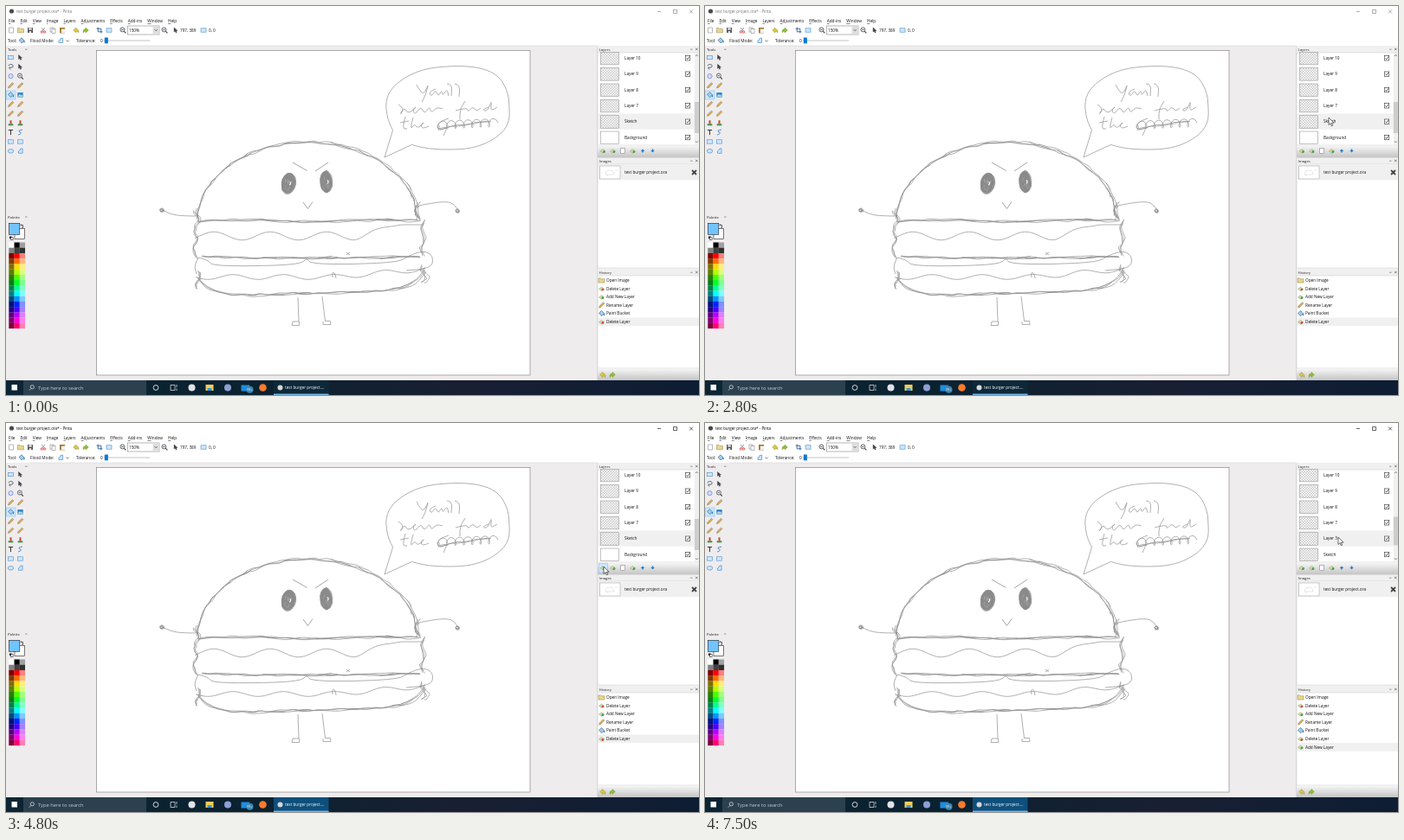
Write an HTML page that moves like this. It is 800x450 px and loops after 8000 ms.

```html
<!DOCTYPE html>
<html lang="en">
<head>
<meta charset="utf-8">
<title>Burger sketch</title>
<style>
html, body { margin: 0; width: 100%; height: 100%; overflow: hidden; background: #fff; }
svg { display: block; width: 800px; height: 450px; }
text { font-family: "Open Sans", "Noto Sans", sans-serif; white-space: pre; }
.key { text-decoration: underline; }
</style>
</head>
<body>
<svg id="stage" viewBox="0 0 800 450" xmlns="http://www.w3.org/2000/svg"></svg>
<script>
const LOOP = 8000, STEP = 100;
const { sin, cos, abs, sign, sqrt, PI } = Math;
const clamp = v => Math.max(0, Math.min(1, v));

// ---- markup helpers ----
const rect = (x, y, w, h, fill, more = '') =>
  `<rect x="${x}" y="${y}" width="${w}" height="${h}" fill="${fill}" ${more}/>`;
const frame = (x, y, w, h, fill, line = '#888') => rect(x, y, w, h, fill, `stroke="${line}" stroke-width=".6"`);
const path = (d, stroke, width = 0.7, fill = 'none') =>
  `<path d="${d}" stroke="${stroke}" stroke-width="${width}" fill="${fill}"/>`;
const disc = (x, y, r, fill) => `<circle cx="${x}" cy="${y}" r="${r}" fill="${fill}"/>`;
const ring = (x, y, r, line, fill = 'none') =>
  `<circle cx="${x}" cy="${y}" r="${r}" fill="${fill}" stroke="${line}" stroke-width=".8"/>`;
const text = (x, y, s, fill = '#111', size = 4.7) =>
  `<text x="${x}" y="${y}" font-size="${size}" fill="${fill}">${s}</text>`;
const group = (id, body) => `<g id="${id}">${body}</g>`;

// ---- small icons, drawn around the origin ----
const glyphs = {
  page: () => frame(-2.3, -3, 4.6, 6, '#fff'),
  folder: () => path('M-3.5-2.5h2.6l1 1h3.4v4.3h-7z', '#8f8352', 0.5, '#e9d68c'),
  disk: () => rect(-3, -3, 6, 6, '#555') + rect(-1.8, -2.6, 3.6, 2.2, '#eee') + rect(-1.2, 1, 2.4, 2, '#ddd'),
  cut: () => path('M-2-3L1.3 1M2-3L-1.3 1', '#777') + ring(-1.7, 2, 1.2, '#d33') + ring(1.7, 2, 1.2, '#d33'),
  copy: () => frame(-3, -3, 4, 5, '#fff') + frame(-1, -1.5, 4, 5, '#fff'),
  paste: () => rect(-3, -3, 6, 6.4, '#a87426') + rect(-1.2, -1.4, 4.2, 4.6, '#eef1f5'),
  undo: (c = '#e2c93c') => path('M-3.3 0L0-3v1.6q4 .4 2.6 4.4Q2 1 0 1.2V3z', '#7a7a20', 0.4, c),
  redo: () => `<g transform="scale(-1 1)">${glyphs.undo('#86c436')}</g>`,
  crop: () => path('M-1.8-3.4V1.8H3.4M-3.4-1.8H1.8V3.4', '#3a6ea5', 1),
  lens: () => ring(-0.6, -0.6, 2.5, '#444', '#e9f2fa') + path('M1.3 1.3L3.4 3.4', '#444', 1.2) + path('M-1.8-.6H.6', '#333'),
  arrow: () => path('M-2-3V2L-.7.9.2 3l1-.5-.8-2H2z', '#333', 0.4, '#445'),
  lasso: () => path('M-2.5-1C-2-4 4-3 2.5 0Q0 2-1.5.5Q-2 2-.5 3.2', '#456', 0.9),
  round: () => ring(0, 0, 2.6, '#7687d8', '#d6ddfa'),
  pen: (c = '#e6b34a') => path('M-3 3L-2.3.8 2-3.3 3.3-2-.9 2.3z', '#555', 0.4, c),
  bucket: () => path('M-3-.5L0-3.2 3 0 .2 3z', '#456', 0.6, '#9ed0f2') + path('M3 0v2.5', '#2a84cf', 1.2),
  image: () => rect(-3.2, -2.7, 6.4, 5.4, '#2a86ce') + path('M-3 2L-.6-.8 1 1 2-.2 3 2z', '#9cc', 0.3, '#cfe8da'),
  stamp: () => rect(-2.8, 1, 5.6, 2, '#3d8f46') + rect(-1, -3, 2, 4, '#c34b35'),
  type: () => path('M-2.6-2.6h5.2M0-2.6V3', '#333', 1),
  line: () => path('M-2.5 3Q3 1-.5-.5T2.5-3', '#3d85c6', 0.9),
  box: () => frame(-3, -2.2, 6, 4.4, '#cfe6fb', '#4b90cc'),
  oval: () => `<ellipse rx="3.2" ry="2.3" fill="#cfe6fb" stroke="#4b90cc" stroke-width=".7"/>`,
  blob: () => path('M-2 2.5Q-3-.5-.5-.8-1-3 2.5-3L2.6 2.5z', '#4b90cc', 0.7, '#cfe6fb'),
  layer: (c = '#3fa146') => path('M-3 .4L0-1.8 3 .4 0 2.6z', '#6b7d4a', 0.4, '#d8e0a8') + disc(1.4, 1.2, 1.4, c),
  up: () => path('M0-2L2.3.4H.8V2H-.8V.4H-2.3z', 'none', 0, '#2c7cc4'),
  down: () => `<g transform="scale(1 -1)">${glyphs.up()}</g>`,
};
const icon = (kind, x, y, tint) => `<g transform="translate(${x} ${y})">${glyphs[kind](tint)}</g>`;
const iconRow = (kinds, x, y, gap = 11.5) => kinds.split(' ').map((k, i) => icon(k, x + i * gap, y)).join('');

// ---- pencil lines ----
let seed = 7;
const rnd = () => (seed = (seed * 16807) % 2147483647) / 2147483647 - 0.5;
const GREY = '#8e8e8e';
const points = s => s.split(' ').map(p => p.split(',').map(Number));
const plot = (f, from, to, n = 40) => Array.from({ length: n + 1 }, (_, i) => f(from + (to - from) * i / n));
const graph = (f, from, to, n) => plot(x => [x, f(x)], from, to, n);

// Smooth line through the middles of the given points.
function smooth(pts) {
  let d = 'M' + pts[0];
  for (let i = 1; i < pts.length - 1; i++) {
    const [a, b] = [pts[i], pts[i + 1]];
    d += `Q${a} ${(a[0] + b[0]) / 2} ${(a[1] + b[1]) / 2}`;
  }
  return d + 'L' + pts[pts.length - 1];
}
const pencil = s => path(smooth(typeof s === 'string' ? points(s) : s), GREY);

// Several shaky passes, each drifting a little and broken into strokes.
function rough(pts, amp = 2.6, passes = 3) {
  let out = '';
  for (let n = 0; n < passes; n++) {
    const dx = rnd() * amp, dy = rnd() * amp;
    const shaky = pts.map(([x, y]) => [x + dx + rnd() * amp, y + dy + rnd() * amp]);
    const size = 9 + n * 4;
    for (let i = 0; i < shaky.length - 2; i += size) out += pencil(shaky.slice(i, i + size + 3));
  }
  return out;
}

const side = (x, y0, y1) => rough(plot(y => [x + 3 * sin(y / 3.5), y], y0, y1, 9), 3.5);
const knot = (x, y) => rough(plot(a => [x + 2 * cos(a), y + 2 * sin(a)], 0, 9, 10), 1.5);

function eye(x, y, rx, ry, tilt) {
  let scratch = '';
  for (let i = 0; i < 14; i++) scratch += `M${rnd() * rx * 1.3} ${rnd() * ry * 1.3}l${rnd() * 3} ${2 + rnd() * 3}`;
  return `<g transform="translate(${x} ${y}) rotate(${tilt})">
    <ellipse rx="${rx}" ry="${ry}" fill="#8a8a8a"/>
    ${rough(plot(a => [rx * cos(a), ry * sin(a)], 0, 2 * PI, 24), 1.2, 2)}
    ${path(scratch, '#b4b4b4', 0.5)}${path('M1.5-2q2 2 0 4', '#fff', 1.1)}</g>`;
}

const lettuce = x => {
  const rise = clamp((x - 405) / 50);
  return 266 - 5 * cos((x - 240) / 65 * 2 * PI) * (1 - rise) - 13 * rise;
};
const cheese = x => 313.5 - 3 * cos((x - 262) / 58 * 2 * PI) - 9 * clamp((x - 380) / 100);
const base = x => {
  const u = (x - 353) / 132;
  return 311 + 22 * (1 - u ** 8) - 4 * u;
};

const burger = () => [
  rough(plot(a => [349 - 127 * cos(a), 246 - 89 * sin(a)], 0, PI, 60), 2.6),
  rough(graph(x => 249 + sin(x / 25), 222, 477, 32), 2.6),
  rough(graph(x => 290 + 1.5 * sin((x - 226) / 80), 226, 478, 32), 2.6),
  rough(graph(base, 222, 485, 40), 2.8),
  side(221, 236, 262), side(219, 262, 290), side(221, 308, 328),
  side(474, 228, 248), side(481, 248, 288), side(483, 300, 320),
  pencil(graph(lettuce, 218, 482)),
  pencil(graph(cheese, 219, 484)),
  pencil('377,314 376,308 380,309 381,315'),
  pencil('222,291 234,294 237,300 280,301 340,299 348,291 350,298 400,299 455,296 464,289 482,283 492,288 493,299 484,304 462,306'),
  pencil('222,291 217,300 220,310'),
  path('M393 285l4 3m0-3l-4 3', GREY),
  pencil('222,243 205,243 190,241 179,235'), knot(180, 236),
  pencil('472,232 490,228 510,226 518,230 522,237'), knot(521, 237),
  path('M337 337L338 365H331L330 369.500H338.500V365M365 336L368.500 364.500H374.500L375 368.500H366V365', GREY),
  eye(326, 205, 8, 12, 10), eye(369.5, 203.5, 6.8, 12.5, -3),
  path('M331 181L347.500 190.500M372 181L357 191M343 227L348.500 234.500 354 226.500', GREY, 0.8),
].join('');

function bubble() {
  const bend = v => sign(v) * abs(v) ** 0.83;
  const rim = plot(a => {
    const x = 510 + 71 * bend(cos(a));
    return [x + sin(5 * a), 118 + 48 * bend(sin(a)) - (sin(a) < 0 ? (x - 510) * 0.06 : 0)];
  }, 0.845 * PI, 2.67 * PI, 60);
  const scribble = plot(t => [497 + 68 * t + 3 * cos(t * 44), 138 - 3 * t + 5 * sin(t * 44)], 0, 1, 60);
  const words = [
    '474,91 479,101 484,100 488,89 484,104 480,111', '496,96 488,99 491,105 496,97 499,105 503,97 504,104 509,96 511,104',
    '509,90 515,90 514,104', '518,90 524,91 523,105',
    '453,114 460,118 454,127 460,117 464,125 475,116 469,119 472,126 479,116 483,125 489,116 491,124 497,117 504,119',
    '530,110 524,118 524,131', '519,121 533,117 533,123 539,116 543,122 548,118', '557,117 549,120 556,122 561,108 559,122 567,117',
    '461,128 457,142 463,142', '455,135 465,133', '470,129 466,144 472,136 475,142 484,134 478,137 481,142 488,139',
  ];
  return path(`M437 175L${rim.join('L')}L437 175`, GREY) + words.map(pencil).join('') + pencil(scribble) +
    pencil('511,130 499,134 497,143 510,139 505,150') + rough(graph(x => 142 - (x - 500) * 0.16, 500, 560, 10), 3, 2);
}

// ---- application window ----
const PANEL = '#efecee', SELECTED = '#f0f0f0';
const dock = (x, y, right, title) => text(x, y, title, '#222', 4.3) + path(`M${right - 10} ${y - 1.5}h2.5`, '#555', 0.6) +
  (x > 600 ? path(`M${right - 4} ${y - 3}l2.6 2.6m0-2.6l-2.6 2.6`, '#444', 0.6) : '');
const caret = (x, y) => path(`M${x} ${y}l1.6 1.8 1.600-1.8`, '#333', 0.6);

function topBars() {
  const menus = 'File Edit View Image Layers Adjustments Effects Add-ins Window Help'.split(' ')
    .map((s, i) => `<tspan class="key" dx="${i && 6}">${s[0]}</tspan><tspan>${s.slice(1)}</tspan>`).join('');
  return rect(0, 0, 800, 46, '#fff') + disc(6.5, 6, 2.6, '#4a4a4a') + text(3, 19, menus) +
    iconRow('page folder disk', 6, 28, 11) + iconRow('cut copy paste', 43, 28, 11) +
    iconRow('undo redo', 81, 28, 11) + iconRow('crop marquee'.replace('marquee', 'box'), 108, 28, 11) +
    icon('lens', 135, 28) + icon('lens', 183, 28) + icon('arrow', 196, 28) + icon('box', 228, 28) +
    frame(140.5, 23, 36.5, 10, '#fff') + text(142, 29.8, '150%') + rect(169.5, 23.3, 7.2, 9.4, '#dedede') + caret(171.5, 27) +
    text(201, 29.8, '797, 389') + text(234, 29.8, '0, 0') +
    text(2, 41.8, 'Tool:') + icon('bucket', 18, 40) + text(28, 41.8, 'Flood Mode:') + icon('blob', 63, 40) + caret(69.5, 39.5) +
    text(81, 41.8, 'Tolerance:') + text(109, 41.8, '0') + path('M113 40H166', '#bbb', 0.9) + rect(113.8, 36.5, 4, 6.8, '#0078d7');
}

function leftDocks() {
  const tools = 'box arrow lasso arrow round lens pen pen bucket image pen pen pen pen stamp stamp type line box box oval blob';
  let out = rect(0, 46, 28, 387, PANEL) + dock(2, 51.7, 32, 'Tools') + frame(0.5, 98, 10.5, 10, '#cce8ff', '#8cc4ee');
  tools.split(' ').forEach((k, i) => out += icon(k, i % 2 ? 16.5 : 5.5, 59.5 + (i >> 1) * 10.83));
  out += dock(2, 245.5, 32, 'Palette') + frame(10, 257.5, 11.5, 12, '#fff', '#222') + frame(3.3, 251.3, 12.5, 13, '#72c4ff', '#222') +
    path('M17 253.500h2.500v3M16.500 253.500l1.200-1.200M19.500 257l-1.300-1.300', '#222') +
    rect(4, 266.5, 2.6, 2.6, '#222') + frame(5.5, 267.8, 2.6, 2.6, '#fff', '#222');
  const cell = 6.22, greys = ['#fff', '#000', '#a0a0a0', '#808080', '#404040', '#303030'];
  for (let i = 0; i < 48; i++) {
    const row = i / 3 | 0, col = i % 3;
    const fill = greys[i] || `hsl(${(row - 2) * 360 / 14} 100% ${25 + 25 * col}%)`;
    out += rect(3.3 + col * cell, 273.5 + row * cell, cell + 0.1, cell + 0.1, fill);
  }
  return out;
}

const layerList = (names, thumbY, thumbH) => names.map((s, i) => {
  const y = 60.3 + i * 18.35;
  return (i === 4 ? rect(683, y - 9.2, 111.5, 18.3, SELECTED) : '') +
    frame(686.5, y - 7, 21, 14.5, s === 'Background' ? '#fff' : 'url(#check)', '#999') + text(714, y + 1.7, s) +
    frame(784.3, y - 2.7, 5.4, 5.4, '#fff', '#333') + path(`M785.5 ${y}l1.3 1.4 2-3`, '#222');
}).join('') + rect(794.8, thumbY, 5.2, thumbH, '#cdcdcd');

const historyKinds = { O: 'folder', D: 'layer', A: 'layer', R: 'pen', P: 'bucket' };
const historyList = names => names.map((s, i) => {
  const y = 317.3 + i * 9.6;
  return (i === names.length - 1 ? rect(683, y - 4.8, 117, 9.6, SELECTED) : '') +
    icon(historyKinds[s[0]], 687.5, y, s[0] === 'D' ? '#d64a3a' : undefined) + text(693, y + 1.7, s);
}).join('');

function rightDocks() {
  const upper = ['Layer 10', 'Layer 9', 'Layer 8', 'Layer 7'];
  const steps = ['Open Image', 'Delete Layer', 'Add New Layer', 'Rename Layer', 'Paint Bucket', 'Delete Layer'];
  const docks = [['Layers', 54, 107], ['Images', 183, 120], ['History', 312, 107]].map(([s, y, h]) =>
    frame(683, y, 118, h, '#fff', '#d2d2d2') + dock(684.5, y - 2.3, 800, s)).join('');
  return rect(682, 46, 118, 387, '#f0f0f0') + path('M682.500 46V433', '#ccc', 0.6) + docks +
    rect(683, 161.5, 117, 14, 'url(#strip)') + rect(683, 419.5, 117, 13.5, 'url(#strip)') +
    rect(794.8, 54, 5.2, 107, '#f0f0f0') +
    path('M796 58l1.400-1.500 1.400 1.500M796 156.500l1.400 1.500 1.400-1.500', '#555') +
    group('layersOld', layerList([...upper, 'Sketch', 'Background'], 111, 36)) +
    group('layersNew', layerList([...upper, 'Layer 3', 'Sketch'], 108.5, 33)) +
    group('hoverAdd', frame(684.3, 162.5, 10, 10.5, '#cce8ff', '#8cc4ee')) +
    group('hoverDel', frame(695.5, 162.5, 10, 10.5, '#dcedfa', '#a8d2f0')) +
    iconRow('layer layer page layer up down', 689, 167.5) +
    rect(683, 183.3, 117, 18, SELECTED) + frame(685.5, 185, 23.5, 15, '#fff', '#aaa') +
    path('M692 195q0-5 5-5t5 5zM703 190h3M694 195v2', '#ccc', 0.5) + text(714, 194.2, 'test burger project.ora') +
    path('M792 190l5 5m0-5l-5 5', '#444', 1.8) +
    group('historyOld', historyList(steps)) + group('historyNew', historyList([...steps, 'Add New Layer'])) +
    iconRow('undo redo', 689, 426.5, 11);
}

const taskbar = () => rect(0, 433, 800, 17, 'url(#bar)') + rect(6.5, 438, 6.5, 6.5, '#fff') +
  rect(20, 433, 142, 17, '#2b414f') + ring(30.3, 440.8, 2.1, '#ddd') + path('M28.800 442.500l-2 2.200', '#ddd') +
  text(37, 443.7, 'Type here to search', '#c4ccd2', 5.75) + ring(173, 441.5, 2.9, '#fff') +
  path('M190 438.500h5v6h-5zM197 438v3M197 442.500v2.500', '#eee') +
  disc(214.5, 441.5, 4, '#e3e3e8') + rect(230.5, 438, 9, 7, '#f4cd57') + rect(232.5, 442, 5, 3, '#3c93d8') +
  disc(256, 441.5, 4, '#8f9fd6') + rect(271.5, 438.5, 9.5, 7, '#1e8ee0') + disc(281.5, 443.7, 4, '#3f86b0') +
  text(278, 445.3, '99+', '#fff', 3.7) + disc(296.5, 441.5, 4.3, '#ff7a2c') +
  rect(309, 433, 63.5, 17, 'currentColor', 'id="tab"') + rect(309, 448.6, 63.5, 1.4, '#76b9ed') +
  disc(316.5, 441.5, 3, '#d8d8d8') + text(322, 443.3, 'test burger project....', '#fff');

const fade = (id, dir, ...stops) => `<linearGradient id="${id}" ${dir}>` +
  stops.map((c, i) => `<stop offset="${i / (stops.length - 1)}" stop-color="${c}"/>`).join('') + '</linearGradient>';

const el = id => document.getElementById(id);
el('stage').innerHTML = `<defs>
    <pattern id="check" width="3" height="3" patternUnits="userSpaceOnUse">
      ${rect(0, 0, 3, 3, '#fff')}${rect(0, 0, 1.5, 1.5, '#c8c8c8')}${rect(1.5, 1.5, 1.5, 1.5, '#c8c8c8')}</pattern>
    ${fade('bar', '', '#0c2534', '#0a2230', '#191f33', '#0d1d33')}
    ${fade('strip', 'x2="0" y2="1"', '#f6f6f6', '#c4c4c4')}
  </defs>` +
  rect(0, 0, 800, 450, PANEL) + topBars() + path('M28 46H682', '#d4d4d4', 0.6) +
  group('title', text(12, 8.4, 'test burger project.ora* - Pinta', 'currentColor', 4.5) +
    path('M752 6.500h4M770.500 4.500h4v4h-4zM789 4.500l4 4m0-4l-4 4', 'currentColor', 0.6)) +
  frame(104.5, 51.5, 500.5, 375.5, '#fff', '#777') +
  burger() + bubble() + leftDocks() + rightDocks() + taskbar() +
  group('cursor',
    group('arrow', path('M0 0V8.500L2 6.700 3.400 9.800 4.700 9.200 3.300 6.200H6z', '#111', 0.6, '#fff')) +
    group('hand', path('M-1 4V.5Q0-.7 1 .5V3.200L4 4.200V7L3 9.300H-1.200L-3.300 6V4.800Z', '#111', 0.7, '#fff')));

// ---- motion: moves of the pointer as start, end, target x, y ----
const moves = [
  [1400, 2200, 720, 120], [2300, 2800, 720, 129], [3100, 3400, 719, 130], [3700, 4100, 699, 171],
  [4100, 4500, 690, 166], [5700, 6600, 725, 130], [6900, 7500, 731, 132],
];
function pointer(t) {
  let x = 703, y = 179;
  for (const [from, to, tx, ty] of moves) {
    const f = clamp((t - from) / (to - from)), e = f * f * (3 - 2 * f);
    x += (tx - x) * e;
    y += (ty - y) * e;
  }
  return [x, y];
}

const show = (id, on) => el(id).setAttribute('visibility', on ? 'visible' : 'hidden');

function draw(t) {
  const added = t >= 7100, active = t >= 4800;
  show('hand', t >= 1400 && t < 1500);
  show('arrow', t >= 1500);
  el('cursor').setAttribute('transform', `translate(${pointer(t)})`);
  ['layers', 'history'].forEach(s => {
    show(s + 'Old', !added);
    show(s + 'New', added);
  });
  show('hoverDel', t >= 4100 && t < 4400);
  show('hoverAdd', t >= 4400 && !added);
  el('title').setAttribute('color', active ? '#000' : '#777');
  el('tab').setAttribute('color', active ? '#0f4f7c' : '#0d2939');
}

const start = performance.now();
function tick() {
  const t = (performance.now() - start) % LOOP;
  draw(Math.floor(t / STEP) * STEP);
  requestAnimationFrame(tick);
}
tick();
</script>
</body>
</html>
```
